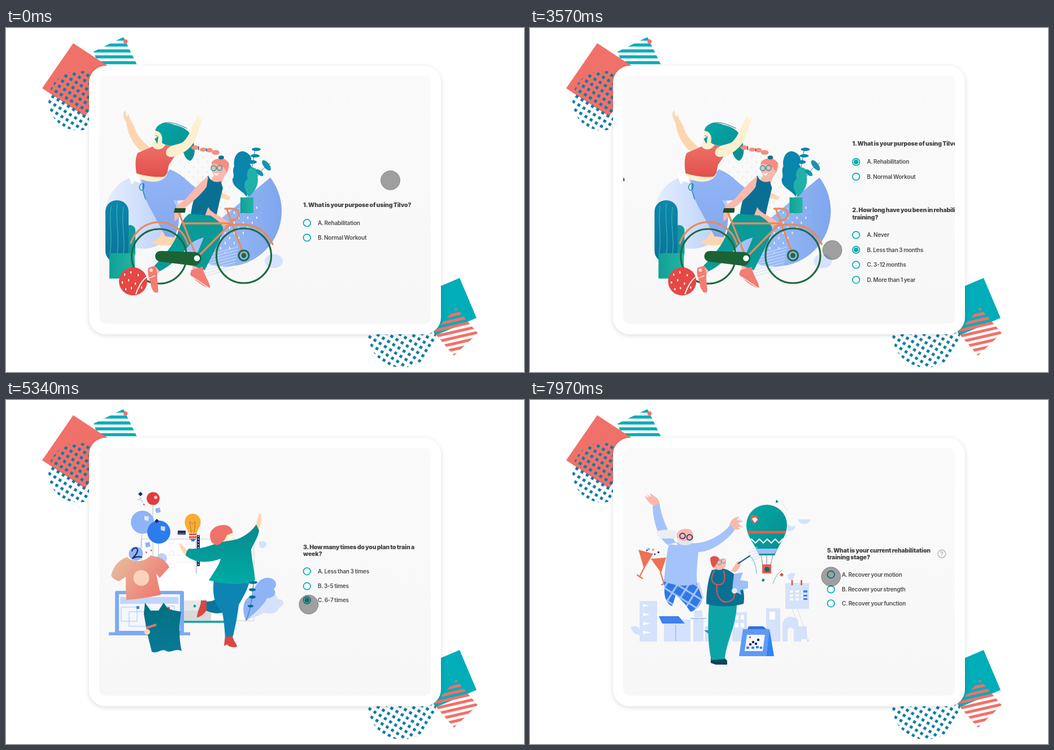
Recreate the animation shown at these times as an HTML page. Size 917 px wide and 611 px high, loop 8000 ms.

```html
<!DOCTYPE html>
<html lang="en">
<head>
<meta charset="utf-8">
<title>Training questionnaire</title>
<style>
html,body{margin:0;width:100%;height:100%;overflow:hidden;background:#fff}
svg{display:block;width:917px;height:611px}
text{font-family:Inter,"Liberation Sans",sans-serif}
.q{font-size:10.5px;font-weight:900;letter-spacing:-.2px;word-spacing:-.5px;fill:#484848}
.o{font-size:10px;font-weight:600;letter-spacing:-.2px;word-spacing:-.6px;fill:#4c4c4c}
.ring{fill:none;stroke:#00acb8;stroke-width:1.7}
.teal{fill:#00adb9}.coral{fill:#f0716a}.navy{fill:#1b2a6b}.deep{fill:#0a7093}
.cream{fill:#fdf0d0}.peach{fill:#fdd6b0}.pink{fill:#fbb8ad}.pale{fill:#d5e2fb}.sky{fill:#8fb4f6}
.line{fill:none;stroke-linecap:round;stroke-linejoin:round}
</style>
</head>
<body>
<svg viewBox="0 0 917 611">
<defs>
<linearGradient id="panel" x2="0" y2="1"><stop stop-color="#fafafa"/><stop offset="1" stop-color="#f7f7f7"/></linearGradient>
<linearGradient id="haze"><stop stop-color="#e6eefd"/><stop offset="1" stop-color="#b4ccf9"/></linearGradient>
<linearGradient id="disc" x2="1" y2="0"><stop stop-color="#a8c5f9"/><stop offset="1" stop-color="#7fa6ee"/></linearGradient>
<linearGradient id="cloth" x2="0" y2="1"><stop stop-color="#93b6f7"/><stop offset="1" stop-color="#84a8ee"/></linearGradient>
<linearGradient id="red" x2="0" y2="1"><stop stop-color="#f0716a"/><stop offset="1" stop-color="#e1504b"/></linearGradient>
<linearGradient id="sea" x2="1" y2="1"><stop stop-color="#00a9a6"/><stop offset="1" stop-color="#0a8b8f"/></linearGradient>
<linearGradient id="coat" x2="0" y2="1"><stop stop-color="#09888d"/><stop offset="1" stop-color="#00aca4"/></linearGradient>
<linearGradient id="pot"><stop stop-color="#10a098"/><stop offset="1" stop-color="#25b4a0"/></linearGradient>
<linearGradient id="stem" x2="0" y2="1"><stop stop-color="#0d86ac"/><stop offset="1" stop-color="#0a7498"/></linearGradient>
<linearGradient id="reef" x2="0" y2="1"><stop stop-color="#00707f"/><stop offset="1" stop-color="#087a97"/></linearGradient>
<linearGradient id="shirt" x2="1" y2=".6"><stop stop-color="#e5c3a2"/><stop offset="1" stop-color="#f0796f"/></linearGradient>
<pattern id="dots" width="10.8" height="10.8" patternUnits="userSpaceOnUse" patternTransform="rotate(32)"><path d="M2.800 2.800h5.200v5.200H2.800z" fill="#0c7ca6"/></pattern>
<pattern id="rain" width="16" height="18" patternUnits="userSpaceOnUse"><path d="M4 2v4M12 11v4" stroke="#e2e6eb" stroke-width="1.5"/></pattern>
<pattern id="snow" width="16" height="18" patternUnits="userSpaceOnUse"><path d="M4 2v4M12 11v4" stroke="#fff" stroke-width="1.6"/></pattern>
<pattern id="rays" width="5" height="5" patternUnits="userSpaceOnUse" patternTransform="rotate(-15)"><path d="M0 2h5" stroke="#cfdffb" stroke-width="1.2"/></pattern>
<pattern id="bars" width="10" height="10.5" y="17" patternUnits="userSpaceOnUse"><path d="M0 0h10v5.500H0z" class="teal"/></pattern>
<pattern id="slats" width="10" height="10" patternUnits="userSpaceOnUse" patternTransform="rotate(-13)"><path d="M0 2h10v5.200H0z" class="coral"/></pattern>
<pattern id="plaid" width="17" height="17" patternUnits="userSpaceOnUse" patternTransform="rotate(32)"><path d="M0 0h17v17H0z" fill="#2f78e8"/><path d="M0 4h17M4 0v17" stroke="#a9c7fa" stroke-width="3"/></pattern>
<clipPath id="view"><rect x="165" y="85" width="587" height="440" rx="10"/></clipPath>
<filter id="soft" x="-10%" y="-10%" width="120%" height="125%"><feDropShadow dx="0" dy="2" stdDeviation="4" flood-opacity=".14"/></filter>
</defs>

<path d="M208 16L155 42 163 64.500H231.500Z" fill="url(#bars)"/>
<path d="M119 27L64 107 140 157 195 77Z" class="coral"/>
<circle cx="211.500" cy="24" r="3.700" class="coral"/>
<circle cx="128" cy="129" r="53" fill="url(#dots)"/>
<path d="M803 444L833 515 760 546 730 475Z" class="teal"/>
<path d="M797 497L835 542 793 582 757 540Z" fill="url(#slats)"/>
<circle cx="701" cy="543" r="60" fill="url(#dots)"/>
<rect x="147" y="67" width="623" height="477" rx="30" fill="#fff" filter="url(#soft)"/>
<rect x="165" y="85" width="587" height="440" rx="10" fill="url(#panel)"/>

<g clip-path="url(#view)">
<g id="page0">
 <circle cx="242" cy="327" r="65" fill="url(#haze)"/>
 <path d="M468 265.500A98.800 98.800 0 0 1 316.500 392Z" fill="url(#disc)"/>
 <ellipse cx="474" cy="414" rx="16" ry="12.500" class="pale"/>
 <path d="M300 226C330 214 370 222 402 246L396 330 310 350Z" fill="url(#rain)"/>
 <path d="M390 332L450 300 452 344 400 400 330 396Z" fill="url(#snow)"/>
 <path d="M340 408L412 384 404 428 350 444Z" fill="url(#rays)"/>
 <!-- plants -->
 <g fill="#0a85ad">
  <path d="M426 300C420 288 400 284 401 268C406 262 399 254 404 246C402 232 408 218 420 219C432 222 438 232 432 242C440 252 432 262 432 270Z"/>
  <ellipse cx="443" cy="215.500" rx="8" ry="3"/><ellipse cx="441" cy="227" rx="8" ry="3"/><ellipse cx="436" cy="238" rx="8" ry="3.300"/>
  <path class="line" d="M428 298L441 214M430 298C436 276 450 250 468 240" stroke="#0a85ad"/>
 </g>
 <path d="M430 300C420 286 420 272 428 268C424 256 430 246 438 248C448 250 444 262 446 268C446 284 438 292 430 300Z" fill="#20b0a8"/>
 <ellipse cx="461" cy="244" rx="5" ry="11" transform="rotate(-38 461 244)" fill="#1593b0"/>
 <ellipse cx="449" cy="257" rx="4" ry="8" transform="rotate(-50 449 257)" fill="#1593b0"/>
 <path d="M415 301h23v28h-23z" fill="url(#pot)"/>
 <rect x="210" y="350" width="19" height="60" rx="9" fill="#0f9b9c"/>
 <rect x="176" y="306" width="41" height="110" rx="20" fill="url(#stem)"/>
 <path class="line" d="M186 316c-5 30 4 54-2 84M197 312c-4 32 5 56 0 88M208 318c-5 30 4 54 0 82" stroke="#38b2b5" stroke-width="1.200"/>
 <path d="M183 400h45v45h-45z" fill="url(#pot)"/>
 <!-- dancer -->
 <path class="peach" d="M276 362C274 372 262 378 257 381C264 387 290 387 301 384L300 362Z"/>
 <path d="M240 266C262 272 282 262 290 251C318 262 322 278 345 288C335 304 312 308 296 306C310 328 308 352 298 372L282 370C270 345 252 318 246 300C242 288 240 278 240 266Z" fill="url(#cloth)"/>
 <path class="cream" d="M231 254L286 258C282 268 272 274 258 273C246 272 236 268 231 264Z"/>
 <path class="peach" d="M211 146C206 150 207 160 213 168C215 186 222 200 232 212C238 220 250 222 258 216C248 206 234 196 228 178C225 168 220 164 219 160L217 152C216 160 213 160 211 146Z"/>
 <path d="M233 222C246 216 258 212 266 206C280 208 292 206 303 214C300 230 292 236 288 244C286 254 286 260 280 264C262 266 244 262 231 258C229 246 228 232 233 222Z" fill="url(#red)"/>
 <path class="cream" d="M264 184C262 192 264 203 258 208C262 218 276 218 282 208L284 186C278 176 268 176 264 184Z"/>
 <path d="M264 182C268 168 284 166 298 172C316 176 330 184 333 208C336 222 332 232 326 236C312 230 318 218 306 212C296 208 284 210 276 204C278 192 275 184 264 182ZM263 197L270 192 268 206Z" fill="url(#sea)"/>
 <path class="line" d="M276 170C290 164 306 172 320 178" stroke="#0b6a90"/>
 <path class="line" d="M267 183l5 1M265 191l3 1" stroke="#b5725d"/>
 <path class="cream" d="M350 154L343 165 342 156C338 156 338 164 334 166C328 176 326 190 314 202C306 208 294 206 286 214C280 222 284 230 294 229C312 226 330 212 336 196C340 186 342 178 350 154Z"/>
 <path d="M215 256L236 262 238 276 228 272 222 278Z" fill="#fff"/>
 <path class="line" d="M241 276c-8 4-4 14 0 12s4-10 2-12l-1 12 5 16" stroke="#1580b0" stroke-width="1.300"/>
 <!-- rider -->
 <path class="peach" d="M378 290L397 300 394 306 376 300Z"/>
 <g fill="#f68d82"><ellipse cx="335" cy="212.500" rx="7" ry="4"/><ellipse cx="349" cy="216" rx="6" ry="3.500"/><ellipse cx="360" cy="217" rx="6" ry="4"/><ellipse cx="371" cy="221" rx="7" ry="4.300"/></g>
 <path d="M341 210v7M355 214v5" stroke="#0a7093" stroke-width="1.500"/>
 <path class="pink" d="M364 238C366 232 384 230 393 238C398 246 392 258 386 264L380 282 360 274 368 262C364 256 363 246 364 238Z"/>
 <path d="M364 241C368 230 388 227 395 241L391 257C388 247 378 241 364 241Z" fill="#f68d82"/>
 <ellipse cx="381" cy="230" rx="5" ry="3.500" class="deep"/>
 <g fill="none" stroke="#0da2ad" stroke-width="1.500"><circle cx="367.500" cy="249" r="4.500"/><circle cx="378" cy="248.500" r="4.500"/></g>
 <path d="M367 257q6 3 10 0q-2 6-6 5z" fill="#fff"/>
 <path d="M358 262C352 270 344 284 334 300C330 312 328 322 327 334L372 336C376 316 380 300 384 284L380 272C370 276 362 272 358 262Z" class="deep"/>
 <path class="pink" d="M358 264C346 270 330 290 318 304C308 310 298 318 298 328L298 343C306 340 310 330 314 322C324 314 346 296 355 282ZM358 318C362 328 380 334 396 346L390 354C374 346 360 340 352 334Z"/>
 <path class="pink" d="M270 420l10 6-14 12-8-10zM330 420l18 6-4 12-14-6z"/>
 <path d="M324 330L362 333C380 345 386 352 384 362C376 382 366 402 352 430L330 422C338 400 346 384 350 372C336 376 330 380 324 386C310 404 290 424 272 432L263 422C280 404 298 384 304 364C308 350 314 338 324 330Z" fill="#0a9a97"/>
 <!-- bicycle -->
 <g class="line" stroke="#e88a5f" stroke-width="3.300">
  <path d="M221 382A53 55 0 0 1 322 384M389 352Q450 338 472 384"/>
  <path d="M306 328L338 408M314 347H398L338 408M388 321H401Q413 322 412 333Q410 341 400 341M391 322L421 404"/>
 </g>
 <g fill="none" stroke="#1f6b42" stroke-width="3.200"><circle cx="271" cy="405.500" r="48.500"/><circle cx="421" cy="404.500" r="48.500"/><circle cx="421" cy="404" r="9"/></g>
 <circle cx="421" cy="404" r="4.500" fill="#1f6b42"/>
 <path d="M275 396L336 398Q348 402 345 412Q342 423 330 422L273 415Q264 413 264 405Q265 396 275 396Z" fill="#1c6235"/>
 <path d="M299 320h19l-1 8h-20z" fill="#17502c"/>
 <circle cx="338" cy="409" r="5.200" fill="#fff"/>
 <path d="M252 426L264 422 268 436C266 450 272 464 268 471C262 472 256 462 256 452C252 444 250 434 252 426ZM328 430L348 424C350 440 362 452 361 461C354 464 332 446 326 438Z" fill="#f37d73"/>
 <path class="line" d="M254 444l10-4M255 468q4 5 12 2M330 442l28 19" stroke="#fff" stroke-width="1.300"/>
 <circle cx="257" cy="430" r="3" fill="#fff" opacity=".7"/>
 <circle cx="225" cy="450" r="25" fill="#e54845"/>
 <path class="line" d="M249 442Q238 450 230 472" stroke="#fff" stroke-width="2"/>
 <path d="M210 436v4M221 432v4M234 437v4M206 450v4M217 446v4M229 452v4M212 462v4M222 460v4M240 459v4" stroke="#fff" stroke-width="2"/>
</g>

<g id="page1">
 <path d="M240 247H439V392H240Z" fill="#fff" stroke="#e4e5e9" stroke-width="2.500"/>
 <path d="M289 248h8v7h-8zM289 269h8v7h-8zM289 291h8v7h-8zM302 256h30M302 276h30M302 288h30" fill="none" stroke="#e5e7ee"/>
 <path d="M337 236V308" stroke="#d4d5da" stroke-width="3"/>
 <path d="M338 240h5v55h-5z" class="navy"/><path d="M340.500 241v54" stroke="#fff" stroke-width="1.500" stroke-dasharray="2 3"/>
 <path d="M304 232h14v7h-14z" class="navy"/><path d="M305 237h12" stroke="#f0716a"/>
 <path d="M363 356h-48v38h48z" fill="#d9d9da"/><path d="M315 356h48v18h-48z" fill="#e6e6e7"/>
 <path d="M300 394H395" stroke="#0ba5a8" stroke-width="3.500"/>
 <path d="M331 366l3-3 3 3-3 3z" fill="#0ba5a8"/>
 <!-- balloons -->
 <path class="line" d="M260 187V280M241 238Q238 262 238 280M270 255V280" stroke="#9fa9c4" stroke-width=".8"/>
 <circle cx="260.500" cy="175" r="11.500" fill="#df3d3f"/>
 <circle cx="241.500" cy="217" r="20.500" class="sky"/>
 <circle cx="270.500" cy="234.500" r="20.500" fill="#2d7cee"/>
 <circle cx="230" cy="273" r="12.500" class="sky"/><circle cx="276" cy="281" r="9" fill="#b9d0fa"/>
 <path class="line" d="M223 268C225 262 233 261 233 267C232 274 226 279 224 281Q231 277 240 279" stroke="#1b2a6b" stroke-width="2.200"/>
 <path d="M238 163l4 4-4 4-4-4zM267 211l4 4-4 4-4-4z" class="navy"/>
 <path d="M264 193l8-2 2 8-8 2zM246 254l8-2 2 8-8 2z" class="sky"/>
 <path d="M245 206l8 1-1 8-7-2zM274 224l8 1-1 8-7-2zM262 171l5-1 1 5-5 1z" fill="#fff" opacity=".75"/>
 <path d="M243 184l3 1-2 3zM247 269l3 1-2 3zM256 265l3 2-3 2z" fill="#df3d3f"/>
 <path class="line" d="M233 177q8-2 9 5M236 173l4 2" stroke="#8fa3d8"/>
 <path d="M323 236C322 229 316 225 316.500 216A14 14 0 0 1 344.500 216C345 225 339 229 338 236Z" fill="#f8ad35"/>
 <path class="line" d="M328 236L325 216l5 4 5-4-2 20" stroke="#b8742a"/>
 <path d="M324 237h13v3h-13zM324 242h13v3h-13zM325 246h11v2h-11z" fill="#e2504b"/><path d="M328 248h6v3h-6z" fill="#2d7cee"/>
 <!-- laptop -->
 <rect x="193" y="339" width="122" height="76" rx="3" fill="#7fa9f3"/>
 <path d="M200 345h108v65H200z" fill="#f3f7ff"/><path d="M202 350h103v12H202z" fill="#c3d6fa"/>
 <path d="M204 368h28v25h-28zM218 376h30v26h-30zM286 366h12v12h-12z" fill="none" stroke="#a8c2f2"/>
 <path d="M231 366h5v5h-5zM289 372h5v5h-5z" fill="#3f7fe8"/><path d="M286 368h4v4h-4z" fill="#df3d3f"/>
 <path d="M182 412.500H326V418H182z" fill="#7fa9f3"/>
 <path d="M215 279C225 290 246 288 256 276L272 280C280 284 286 290 289 297L272 316 266 308C268 322 272 336 274 346C254 350 232 354 213 355C212 340 212 326 212 314L200 322C194 320 188 316 186 312C190 296 198 284 215 279Z" fill="url(#shirt)"/>
 <circle cx="239.500" cy="316" r="14" fill="#fbd3bb"/>
 <path d="M246 360L256 374 270 374 279 360 288 372 310 376C306 400 306 424 311 446C300 440 292 450 284 446C276 440 268 452 258 447L250 414 244 380Z" fill="url(#reef)"/>
 <path d="M248 405L266 399" stroke="#f0716a" stroke-width="4"/><circle cx="250" cy="412" r="5" class="peach"/>
 <!-- foliage -->
 <path class="pale" d="M425 392C430 370 450 352 462 346C478 340 482 350 480 354C494 352 494 366 484 368C480 382 464 380 456 378C448 384 436 386 425 392Z"/>
 <path class="sky" d="M425 392C416 372 420 350 436 348C440 326 452 314 466 316C478 318 482 328 474 336C482 346 470 352 462 352C456 366 440 378 425 392Z"/>
 <path class="line" d="M425 392C434 370 436 350 438 324" stroke="#0c7ca6"/>
 <g fill="#0c6c99"><ellipse cx="437" cy="324" rx="8" ry="2.700"/><ellipse cx="436" cy="337" rx="6" ry="2.700"/><ellipse cx="436" cy="350" rx="6" ry="2.700"/><ellipse cx="433" cy="366" rx="5" ry="2.300"/></g>
 <path class="pale" d="M448 252q8-4 13 3q1 8-9 8q-6-4-4-11z"/>
 <!-- walker -->
 <path d="M374 352C366 358 360 358 352 358L352 373C366 380 382 382 392 372Z" fill="#0a759f"/>
 <path d="M355 356L345 356C346 364 338 376 338 386C344 386 350 380 355 374ZM388 418L401 417C401 427 409 433 409 438C403 441 394 438 391 434L386 437Z" fill="#d94742"/>
 <path d="M368 320C364 350 372 366 383 378C386 392 387 408 388 421L402 419C406 402 410 382 412 364C420 350 428 336 431 322Z" fill="#0e84b3"/>
 <path class="peach" d="M442 224L447 204C450 200 453 202 452 210L451 220 447 232ZM321 267L308 254C305 258 312 268 314 272L319 276Z"/>
 <path class="cream" d="M386 238L402 232C404 244 402 252 396 256L382 258Z"/>
 <path d="M376 254C388 250 400 250 410 247C430 239 440 226 443 221L448 232C446 246 436 258 434 266C436 290 440 306 441 320C420 330 384 328 359 320C368 306 378 292 380 282C358 290 334 290 318 276C319 270 321 266 324 264C344 266 362 258 376 254Z" fill="url(#coat)"/>
 <path class="coral" d="M362 246C358 232 370 222 386 222C396 222 402 230 401 236L391 240C388 250 380 256 374 258C366 256 362 252 362 246Z"/>
 <path d="M394 243l7-2q0 6-4 7z" fill="#fff"/>
</g>

<g id="page2">
 <g class="pale">
  <path d="M194 357h31v72h-31zM237 390h47v39h-47zM289 388h18v41h-18zM291 374h14v12h-14zM310 402h14v27h-14zM358 377h26v52h-26zM418 370h25v59h-25zM447 429V396Q450 385 462 385Q475 386 475 396V429H467V408Q461 400 456 408V429ZM475 402h15v27h-15zM480 429h14v-4h-14z"/>
  <path d="M178 404q12-6 16 4v10q-12-2-16-14zM456 312q6-8 14-3l-6 12q-8-2-8-9zM474 212h23a12 12 0 0 1-23 0zM456 220q8 8 14 2q-2 14-14 10z"/>
 </g>
 <path d="M200 362l10 3-10 3zM200 378l12 3-12 3zM200 394l13 3-13 3zM200 410l14 3-14 3zM363 382h6v8h-6zM373 382h6v8h-6zM363 396h6v8h-6zM373 396h6v8h-6zM424 376h10v14h-10z" fill="#fff"/>
 <path d="M228 384h35l11 13h-40zM308 409h18l-6 9z" fill="#3f80f2"/><path d="M258 400v28M284 388h28" stroke="#a9c6fa" stroke-width="2"/>
 <path class="line" d="M424 186l14 14M444 180l12 16M462 338l30 86M452 340l20 52" stroke="#d4dcea"/>
 <!-- toast -->
 <path d="M192 266L218 273 202 300ZM214 282L241 280 232 307Z" fill="#ef7053"/>
 <path class="line" d="M202 298L194 314M190 311l9 6M231 306l6 20M233 328l9-3" stroke="#ef7053" stroke-width="2.200"/>
 <path d="M206 265l3 2-3 2zM220 272l3 2-3 2zM226 269h3v3h-3z" class="navy"/><path d="M208 263h4v4h-4z" class="sky"/><circle cx="218" cy="266" r="1.700" class="coral"/>
 <!-- jumping man -->
 <path d="M288 326L300 324 308 352 296 356Z" fill="#d9dadd"/>
 <path d="M237 318C256 330 276 330 294 322L305 352C304 364 294 374 284 376L274 362 258 346 252 366C242 364 238 350 238 340Z" fill="url(#plaid)"/>
 <path class="pink" d="M230 188C214 190 208 180 203 170C210 174 214 174 204 166L214 172 212 165 222 172C228 176 230 182 230 188ZM353 222C356 210 364 208 371 207L366 213 378 215 368 219 377 226 368 225 372 230Q364 230 358 231Z"/>
 <path d="M217 188C218 214 226 246 245 258C258 250 270 254 280 254C310 258 340 240 355 221L362 232C344 254 318 270 298 270C296 292 294 310 296 326C276 332 256 330 237 322C240 300 240 280 246 256L262 258C248 240 236 220 229 184Z" fill="#a4c3fb"/>
 <path d="M222 234q14-6 36-2v14h-28zM258 238q6-8 14-8l-8 16z" fill="#eceef2"/>
 <path class="pink" d="M260 244C258 232 270 226 284 230C292 238 290 250 284 254C272 258 262 252 260 244Z"/>
 <path d="M262 245C266 252 280 252 288 246C290 254 284 258 274 258C264 258 258 252 262 245Z" fill="#e4e6ea"/>
 <g fill="none" stroke="#1b2a6b" stroke-width="1.700"><circle cx="270" cy="241.500" r="4.800"/><circle cx="282.500" cy="244" r="4.800"/></g>
 <!-- hot air balloon -->
 <path d="M383 222A36 36 0 0 1 455 222C455 242 440 256 433 276H406C398 256 383 242 383 222Z" fill="url(#sea)"/>
 <path d="M385 232.500H453.500L452 237H386Z" fill="#e2604e"/>
 <path class="line" d="M392 247l7 7 7-7 7 7 7-7 7 7 7-7 7 7 6-7" stroke="#fff" stroke-width="2"/>
 <path d="M401 264H438L433 273H405Z" fill="#9dbff9"/>
 <path d="M409 276L412 293M430 276L426 293M419 276v17" stroke="#506c8a" stroke-width=".8"/>
 <path d="M411 292h16v16h-16z" fill="#e2604e"/><path d="M415 299l3-3 6 2v7h-8z" fill="#0a6a70"/>
 <path d="M392 204l10 2 3 8-8 6-7-7z" fill="#e2604e"/><path d="M393 211l5-3 5 4-5 6z" fill="#fff"/>
 <path d="M436 177l4 4-5 2z" class="deep"/><path d="M445 307l4 3-3 4-4-3z" fill="#df4a45"/><path d="M412 317l4 2-3 4-3-2z" fill="#14808f"/>
 <path d="M385 270L402 258 406 284 394 290Z" fill="url(#rays)"/>
 <path class="line" d="M388 276q12 8 13 32M430 326q4-14 16-24" stroke="#4db5b6"/>
 <!-- calendar and easel -->
 <path class="pale" d="M452 325h42v46h-42z"/>
 <path d="M464 320v9M480.500 320v9" stroke="#e2604e" stroke-width="3"/>
 <path d="M460 340h22M460 347h22M460 354h22" stroke="#fff" stroke-width="4" stroke-dasharray="6 4"/><path d="M484 338h7v4h-7zM484 346h7v3h-7zM484 352h7v3h-7z" fill="#3f80f2"/>
 <path d="M387 402h26l10 9h-40z" fill="#2f6fe0"/><path d="M377 407H424L418 455H370Z" fill="#5f99f6"/><path d="M424 407L432 455H418Z" fill="#2d86f2"/>
 <path d="M384 417H416L412 446H380Z" fill="#f4f6fb"/>
 <path d="M388 432h4v4h-4zM393 428h4v4h-4zM398 431h4v4h-4zM402 424h4v4h-4z" class="navy"/><path d="M383 438h5v4h-5zM392 438h5v4h-5zM400 437h5v4h-5zM407 438h4v4h-4z" fill="#2d86f2"/><path d="M388 420h3v3h-3z" fill="#df4a45"/>
 <!-- doctor -->
 <path d="M320 458h24l5 5v7h-20l-9-3z" fill="#08475d"/>
 <path d="M317 362C314 400 315 436 321 462L345 460C347 430 366 400 366 362Z" fill="#0ba5a8"/>
 <path d="M322 302C314 320 312 345 312 362C332 368 356 368 378 362C381 348 377 330 370 318C362 308 350 300 340 299Z" class="deep"/>
 <path class="pink" d="M327 284C336 280 346 282 347 290C347 298 340 302 334 302L326 300ZM356 304L366 288 374 286 372 296 364 306Z"/>
 <path d="M319 282C320 276 332 276 334 281C337 284 330 288 330 292L325 298C320 294 320 288 319 282Z" fill="#e2504b"/>
 <g fill="none" stroke="#5d97a8"><circle cx="335" cy="288.500" r="4"/><circle cx="342.500" cy="286" r="4"/></g>
 <path class="line" d="M369 290L389 277" stroke="#1b6f93" stroke-width="2.500"/>
 <path d="M361 309L377 306 372 320 386 322 386 334 372 338 374 346 358 338Z" fill="#9fbff8"/>
 <path class="line" d="M326 304C318 318 322 328 334 328S346 314 343 304M331 328C328 350 340 362 352 358S361 346 362 342" stroke="#d9574d" stroke-width="2.200"/>
 <circle cx="362" cy="339" r="5" fill="#e4e6ea"/>
 <circle cx="729" cy="273.300" r="6.900" fill="none" stroke="#b9bcc1" stroke-width="1.600"/>
 <text x="729" y="277" text-anchor="middle" style="font-size:10px;font-weight:700;fill:#b0b3b8">?</text>
</g>
</g>
<circle id="touch" r="17" fill="#000" fill-opacity=".36" stroke="#000" stroke-opacity=".3"/>
</svg>
<script>
const LOOP = 8000, PITCH = 600, STEP = 93.8;
const $ = id => document.getElementById(id);
const clamp = v => Math.max(0, Math.min(1, v));
const span = (t, a, b) => clamp((t - a) / (b - a));
const ease = (t, a, b) => { const p = span(t, a, b); return p * p * (3 - 2 * p); };

function add(parent, tag, attrs, text) {
  const el = document.createElementNS('http://www.w3.org/2000/svg', tag);
  for (const k in attrs) el.setAttribute(k, attrs[k]);
  if (text) el.textContent = text;
  return parent.appendChild(el);
}

// One question: heading lines, options with their heights, picked option and time of the tap
function question(page, y, lines, options, pick, at) {
  const g = add($('page' + page), 'g', {});
  let dot;
  lines.forEach((s, i) => add(g, 'text', {class: 'q', x: 526, y: y + 3.8 + i * 12.5}, s));
  options.forEach(([s, oy], i) => {
    add(g, 'circle', {class: 'ring', cx: 532.8, cy: oy, r: 6.3});
    add(g, 'text', {class: 'o', x: 552, y: oy + 3.6}, s);
    if (i === pick) dot = add(g, 'circle', {class: 'teal', cx: 532.8, cy: oy});
  });
  return {g, dot, at};
}

const list = [
  question(0, 314, ['1. What is your purpose of using Tilvo?'],
    [['A. Rehabilitation', 346.2], ['B. Normal Workout', 372.4]], 0, 1160),
  question(0, 323.5, ['2. How long have you been in rehabilitation', 'training?'],
    [['A. Never', 367.6], ['B. Less than 3 months', 394], ['C. 3-12 months', 420.7], ['D. More than 1 year', 447.3]], 1, 3290),
  question(1, 268.4, ['3. How many times do you plan to train a', 'week?'],
    [['A. Less than 3 times', 311.8], ['B. 3-5 times', 338.2], ['C. 6-7 times', 363.1]], 2, 5060),
  question(1, 327, ['4. How long do you plan to train each time?'],
    [['A. Less than 30 minutes', 355.5], ['B. 30-60 minutes', 382], ['C. 60-90 minutes', 407]], 1, 6600),
  question(2, 267, ['5. What is your current rehabilitation', 'training stage?'],
    [['A. Recover your motion', 310], ['B. Recover your strength', 336.4], ['C. Recover your function', 361.3]], -1, 0)
];

// start, end, x, y
const moves = [[380, 970, 534.4, 331], [2560, 3100, 535.2, 394.4], [4220, 5040, 535.8, 363.3],
  [5920, 6410, 533.6, 382], [7650, 7970, 532.8, 313.7]];

function place(q, dy, alpha = 1) {
  q.g.setAttribute('transform', `translate(0 ${dy.toFixed(2)})`);
  q.g.setAttribute('opacity', alpha);
}

function draw(t) {
  const slide = ease(t, 3511, 3871) + ease(t, 7215, 7440);
  for (let i = 0; i < 3; i++)
    $('page' + i).setAttribute('transform', `translate(${(slide - i) * PITCH} 0)`);

  const settle = 1 - (1 - span(t, 10, 170)) ** 2;
  const up1 = ease(t, 1945, 2300), up2 = ease(t, 5230, 5870);
  const show = p => clamp((p - .55) / .45);
  place(list[0], -14.5 * settle - STEP * up1);
  place(list[1], STEP * (1 - up1), show(up1));
  place(list[2], -STEP * up2);
  place(list[3], STEP * (1 - up2), show(up2));
  for (const q of list) if (q.dot) q.dot.setAttribute('r', 4.3 * span(t, q.at, q.at + 60));

  let x = 680.5, y = 270.6;
  for (const [a, b, tx, ty] of moves) {
    const p = ease(t, a, b);
    x += (tx - x) * p;
    y += (ty - y) * p;
  }
  $('touch').setAttribute('cx', x);
  $('touch').setAttribute('cy', y);
}

function tick() {
  draw(performance.now() % LOOP);
  requestAnimationFrame(tick);
}
tick();
</script>
</body>
</html>
```
